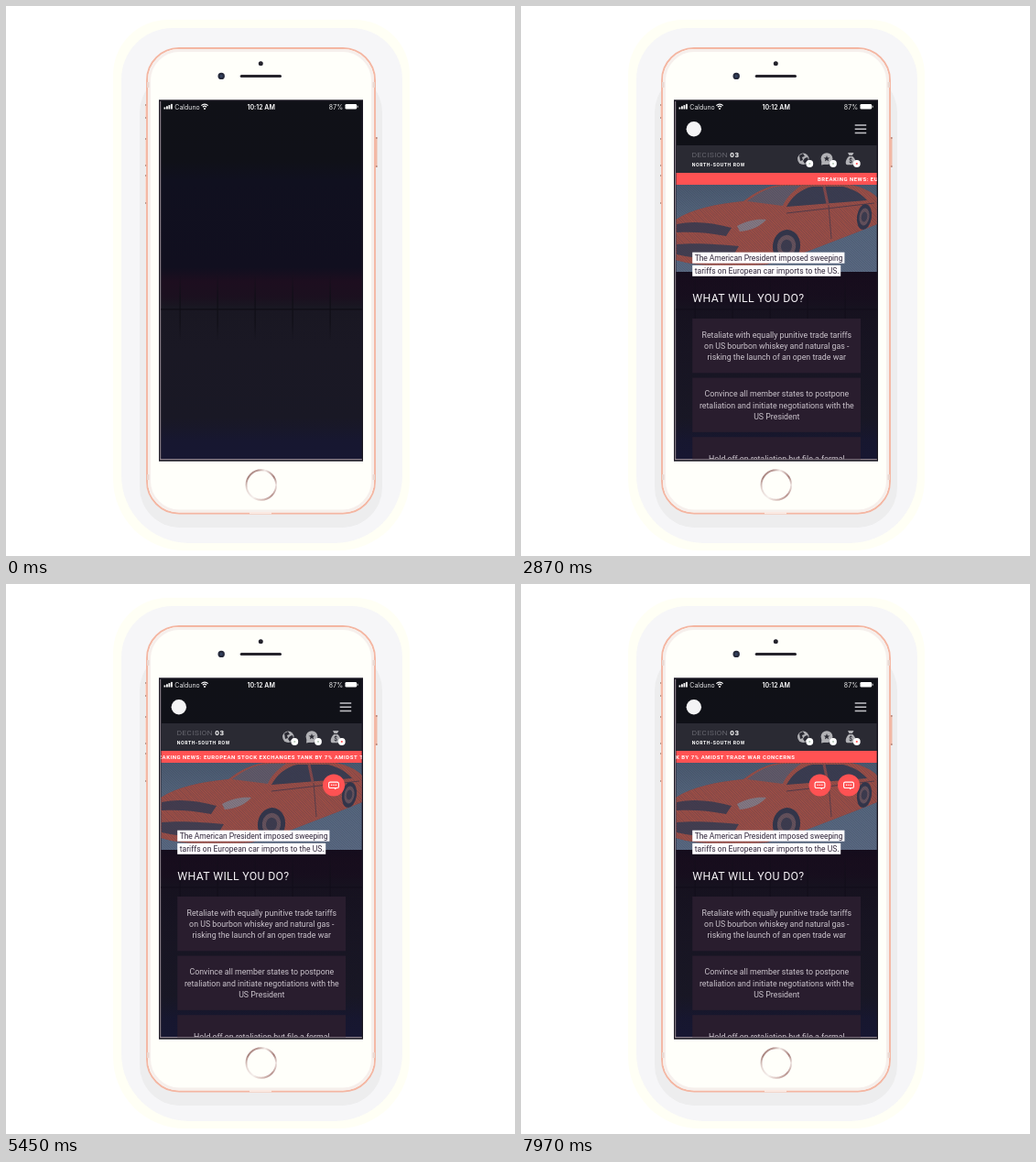
These frames come from a looping animation (556x600 px, 8 s). An HTML page with a canvas:

```html
<!DOCTYPE html>
<html lang="en">
<head>
<meta charset="utf-8">
<title>Phone news game</title>
<style>
html, body { margin: 0; width: 100%; height: 100%; overflow: hidden; background: #fff; }
canvas { display: block; width: 556px; height: 600px; }
</style>
</head>
<body>
<canvas id="stage"></canvas>
<script>
const W = 556, H = 600, LOOP = 8000;
const canvas = document.getElementById('stage');
const ratio = window.devicePixelRatio || 1;
canvas.width = W * ratio;
canvas.height = H * ratio;
const c = canvas.getContext('2d');
const RED = '#ff5253';
const SANS = 'Roboto, "Open Sans", sans-serif';
const UI = 'Inter, Roboto, sans-serif';

const clamp = v => Math.max(0, Math.min(1, v));
const ramp = (t, start, length) => clamp((t - start) / length);
const backOut = u => 1 + 2.7 * (u - 1) ** 3 + 1.7 * (u - 1) ** 2;

function rect(x, y, w, h, fill) {
  c.fillStyle = fill;
  c.fillRect(x, y, w, h);
}

function box(x, y, w, h, r, fill, stroke, width = 1) {
  c.beginPath();
  c.roundRect(x, y, w, h, r);
  if (fill) { c.fillStyle = fill; c.fill(); }
  if (stroke) { c.strokeStyle = stroke; c.lineWidth = width; c.stroke(); }
}

function dot(x, y, r, fill) {
  c.beginPath();
  c.arc(x, y, r, 0, 7);
  c.fillStyle = fill;
  c.fill();
}

function line(x1, y1, x2, y2, color, width) {
  c.beginPath();
  c.moveTo(x1, y1);
  c.lineTo(x2, y2);
  c.strokeStyle = color;
  c.lineWidth = width;
  c.stroke();
}

function shape(path, fill) {
  c.fillStyle = fill;
  c.fill(new Path2D(path));
}

function text(str, x, y, size, color, { weight = 400, gap = 0, align = 'left', font = SANS } = {}) {
  c.font = `${weight} ${size}px ${font}`;
  c.letterSpacing = gap + 'px';
  c.textAlign = align;
  c.fillStyle = color;
  c.fillText(str, x, y);
}

function vertical(y1, y2, stops) {
  const g = c.createLinearGradient(0, y1, 0, y2);
  stops.forEach(([y, color]) => g.addColorStop((y - y1) / (y2 - y1), color));
  return g;
}

function layer(alpha, draw) {
  if (alpha <= 0) return;
  c.save();
  c.globalAlpha = alpha;
  draw();
  c.restore();
}

function drawPhone() {
  rect(0, 0, W, H, '#ffffff');
  box(117, 15, 324, 579, [60, 60, 78, 78], '#fffff5');
  box(126, 24, 307, 562, [56, 56, 74, 74], '#f6f6f8');
  box(146, 72, 265, 497, 44, '#ededee');

  for (const [y, h] of [[107, 16], [144, 31], [184, 32]]) {
    rect(152, y, 2, h, '#f7ddd3');
    rect(152, y, 2, 2, '#b99a90');
    rect(152, y + h - 2, 2, 2, '#b99a90');
  }
  rect(403.5, 143, 2, 33, '#f0b9a6');
  rect(403.5, 143, 2, 2, '#b98c80');
  rect(403.5, 174, 2, 2, '#b98c80');

  box(154, 46, 249, 507.5, 35, '#fffffa', '#f4b6a2', 1.9);
  box(156.5, 48.5, 244, 502.5, 33, null, '#f6efec', 3);
  for (const x of [154, 400.5]) {
    rect(x, 83, 2.5, 6, '#ead9d2');
    rect(x, 511, 2.5, 6, '#ead9d2');
  }
  rect(266, 552, 24, 2.2, '#fbe9e2');

  dot(278.3, 62.7, 2.5, '#23222b');
  dot(235.2, 76.4, 3.7, '#262a3b');
  dot(235.2, 76.4, 1.6, '#34425f');
  box(255.7, 75, 45.3, 3, 1.5, '#26242c');

  const ring = c.createConicGradient(0, 278.8, 522.5);
  [[0, '#efe5e2'], [.12, '#b89490'], [.24, '#d8c0bb'], [.34, '#f5efec'], [.46, '#e5d6d2'],
   [.58, '#a98580'], [.72, '#b99995'], [.79, '#f3ebe8'], [.91, '#a7807c'], [1, '#efe5e2']]
    .forEach(([p, color]) => ring.addColorStop(p, color));
  c.beginPath();
  c.arc(278.8, 522.5, 16.3, 0, 7);
  c.strokeStyle = ring;
  c.lineWidth = 1.9;
  c.stroke();

  rect(167, 102.3, 223, 394.4, '#1b1823');
  rect(168.3, 104, 1, 391, '#a99ca6');
  rect(168.3, 494.1, 220.5, 1, '#a99ca6');
}

function drawBackdrop() {
  rect(169.3, 103.5, 219.5, 390.7, vertical(103, 495, [
    [103, '#101117'], [168, '#101118'], [190, '#10101f'], [285, '#110f1f'], [301, '#1d0e1f'],
    [318, '#1b101f'], [328, '#191722'], [375, '#1a1824'], [450, '#191825'], [474, '#171730'], [495, '#171732']
  ]));
  rect(169, 330.3, 220, 1.3, '#0f0e16');
  const fade = vertical(292, 366, [[292, '#0f0e1600'], [318, '#0f0e16'], [345, '#0f0e16'], [366, '#0f0e1600']]);
  for (let i = 0; i < 5; i++) rect(189.5 + i * 41, 292, 1.2, 74, fade);
}

function drawStatus() {
  for (let i = 0; i < 4; i++) rect(172.5 + i * 2.5, 110.5 - i * 1.2, 1.8, 2 + i * 1.2, '#fff');
  text('Calduno', 184.3, 112.6, 7, '#e6e6e8', { font: UI });
  c.lineWidth = 1.2;
  c.strokeStyle = '#fff';
  for (const r of [2.9, 5.1]) {
    c.beginPath();
    c.arc(217, 112.3, r, Math.PI * 1.25, Math.PI * 1.75);
    c.stroke();
  }
  dot(217, 111.9, 1, '#fff');
  text('10:12 AM', 278.7, 112.6, 7, '#fff', { weight: 600, align: 'center', font: UI });
  text('87%', 368, 112.6, 7, '#eee', { align: 'right', font: UI });
  box(370.5, 107, 12.6, 5.6, 1.3, '#fff');
  rect(383.6, 108.8, .9, 2, '#fff');
}

function badge(x, color) {
  dot(x, 172, 3.9, '#fff');
  dot(x, 172, 1.1, color);
}

function drawHeader() {
  dot(188.8, 134.2, 8.2, '#f4f4f5');
  for (const y of [130, 134.2, 138.4]) line(364.7, y, 377.2, y, '#c3c3c8', 1.5);

  const grey = '#b1b1b5', dark = '#2a2a33';
  rect(169.3, 152, 219.5, 30, dark);
  text('DECISION', 186.8, 165, 8, '#85858d', { weight: 300, gap: .5 });
  text('03', 228.3, 165, 8, '#fff', { weight: 700, gap: .5 });
  text('NORTH-SOUTH ROW', 186.8, 175.2, 5.2, '#fff', { weight: 700, gap: .6 });

  dot(308.3, 166.8, 6.2, grey);
  shape('M304 163 l4 -2 l2 3 l-3 1 l1 3 l-3 1 Z M310 166 l3 -1 l1 3 l-4 4 l-2 -3 Z', dark);
  badge(315.3, '#b5c9b7');
  dot(334, 166.6, 6.4, grey);
  shape('M328.5 169 L328 173.5 L333 172.5 Z', grey);
  c.beginPath();
  for (let i = 0; i < 10; i++) {
    const a = -Math.PI / 2 + i * Math.PI / 5, r = i % 2 ? 1.5 : 3.6;
    c.lineTo(334 + r * Math.cos(a), 166.6 + r * Math.sin(a));
  }
  c.fillStyle = dark;
  c.fill();
  badge(341, '#b5c9b7');
  shape('M357 160 h6.5 l-1.6 3 h-3.4 Z M358.2 164 h4 C366 167 367 173 364 173.3 H356.5 C353.5 173 354.5 167 358.2 164 Z', grey);
  text('$', 360.2, 171.3, 6.5, dark, { weight: 700, align: 'center' });
  badge(366.8, RED);
}

function hatch(color, width) {
  for (let x = 70; x < 390; x += 2.8) line(x, 195, x + 100, 290, color, width);
}

function drawPicture() {
  c.save();
  c.beginPath();
  c.rect(169.3, 195, 219.5, 95);
  c.clip();
  rect(169, 195, 220, 95, vertical(195, 290, [[195, '#4b5a70'], [235, '#56677e'], [290, '#5a6982']]));

  const body = new Path2D('M169 233 C188 221 212 216 243 213 C256 203 268 197 283 195 H360 C374 198 384 203 389 209 V238 L364 248 L312 268 L268 282 C228 285 190 284 169 277 Z');
  c.fillStyle = '#6a4149';
  c.fill(body);
  c.save();
  c.clip(body);
  hatch('#b65545', 1.3);
  c.restore();

  // Glass, seams and front end
  shape('M247 213 C260 203 271 197 288 196 H306 C295 203 289 211 286 218 Z', '#625a69');
  shape('M290 219 C296 208 305 200 318 197 H352 C364 200 372 205 378 212 Z', '#3b3c50');
  line(331, 197, 335, 216, '#86484a', 3);
  line(290, 226, 386, 215, '#573b48', 1.2);
  line(336, 217, 339, 254, '#5b3d48', 1);
  shape('M170 238 C188 234 208 236 230 242 L224 251 C205 247 187 246 170 247 Z', '#443c4e');
  shape('M236 240 C247 234 258 232 268 233 C262 240 252 245 239 246 Z', '#877a84');
  shape('M170 260 C190 258 218 260 238 262 L230 275 C208 277 187 275 170 271 Z', '#443e50');

  const wheel = (x, y, rx, ry) => {
    [[1, '#33354a'], [.68, '#67525c'], [.4, '#3d3b4e']].forEach(([k, color]) => {
      c.beginPath();
      c.ellipse(x, y, rx * k, ry * k, .15, 0, 7);
      c.fillStyle = color;
      c.fill();
    });
  };
  wheel(290, 262, 15, 18);
  wheel(375, 230, 8, 14);
  hatch('rgba(44,52,74,.28)', .9);
  c.restore();

  rect(187.2, 268.7, 166.2, 12, '#fffdff');
  rect(187.2, 282.8, 162, 12, '#fffdff');
  text('The American President imposed sweeping', 189.7, 278, 8.5, '#30263a', { gap: -.05 });
  text('tariffs on European car imports to the US.', 189.7, 292, 8.5, '#30263a', { gap: .04 });
  text('WHAT WILL YOU DO?', 187.3, 323.2, 12.3, '#f4f1f5', { gap: .3 });
}

function drawShade() {
  rect(169.3, 290, 219.5, 204.2, vertical(290, 495, [[290, '#140c1bb0'], [495, '#13122500']]));
}

const CARDS = [
  [341, ['Retaliate with equally punitive trade tariffs',
         'on US bourbon whiskey and natural gas -',
         'risking the launch of an open trade war']],
  [405.6, ['Convince all member states to postpone',
           'retaliation and initiate negotiations with the',
           'US President']],
  [470.2, ['Hold off on retaliation but file a formal',
           'complaint with the trade court']]
];

function drawCards() {
  for (const [y, lines] of CARDS) {
    rect(187.2, y, 183.8, 59.3, '#291d2e');
    const first = y + 33 - (lines.length - 1) * 6.2;
    lines.forEach((s, i) => text(s, 279.3, first + i * 12.4, 8.8, '#cbc4cc', { align: 'center' }));
  }
}

function drawTicker(t) {
  rect(169.3, 182, 219.5, 13, RED);
  text('BREAKING NEWS: EUROPEAN STOCK EXCHANGES TANK BY 7% AMIDST TRADE WAR CONCERNS',
    324 - (t - 2870) * .0643, 190.6, 6, '#fff', { weight: 700, gap: .51 });
}

function drawBubble(x, t, start) {
  const k = backOut(ramp(t, start, 400));
  if (t <= start || k <= 0) return;
  c.save();
  c.translate(x, 219.5);
  c.scale(k, k);
  dot(0, 0, 12, RED);
  box(-5.4, -3.4, 10.8, 6.4, 1.5, null, '#fff', 1.1);
  shape('M0 3 L2 4.8 L3 3 Z', '#fff');
  for (const dx of [-2.3, 0, 2.3]) dot(dx, -.2, .7, '#fff');
  c.restore();
}

function draw(t) {
  c.setTransform(ratio, 0, 0, ratio, 0, 0);
  drawPhone();
  c.save();
  c.beginPath();
  c.rect(169.3, 103.5, 219.5, 390.7);
  c.clip();
  drawBackdrop();
  drawStatus();
  layer(ramp(t, 770, 1000), () => {
    drawShade();
    drawHeader();
    drawPicture();
    drawTicker(t);
  });
  layer(ramp(t, 1050, 1000), drawCards);
  drawBubble(358, t, 3030);
  drawBubble(326.5, t, 5560);
  c.restore();
}

const begin = performance.now();
function tick() {
  draw((performance.now() - begin) % LOOP);
  requestAnimationFrame(tick);
}
tick();
</script>
</body>
</html>
```
